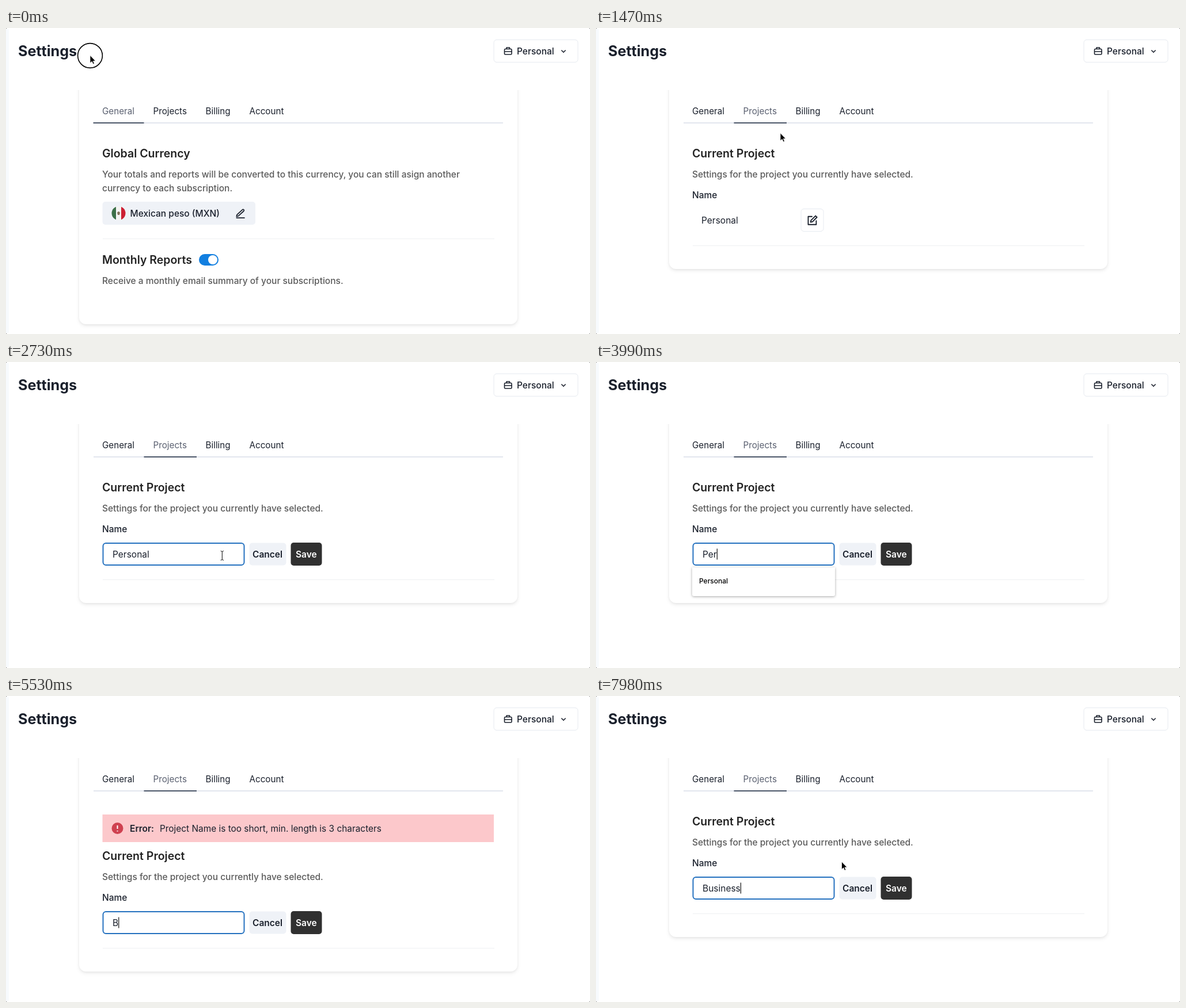
Write an HTML page that moves like this. It is 1014x532 px and loops after 8000 ms.

```html
<!DOCTYPE html>
<html lang="en">
<head>
<meta charset="utf-8">
<title>Project settings</title>
<style>
  html, body { margin: 0; width: 100%; height: 100%; overflow: hidden; background: #555; }
  svg { display: block; width: 100%; height: 100%; }
  text { font: 400 15.5px Inter, "Open Sans", sans-serif; fill: #1a202c; white-space: pre; }
  .title { font-size: 25.2px; font-weight: 700; }
  .heading { font-size: 19.5px; font-weight: 600; fill: #222; }
  .note { font-weight: 500; fill: #5a5a5a; }
  .medium { font-weight: 500; }
  .bold { font-weight: 600; }
  .tab { font-size: 15.2px; }
  .tab.active { fill: #5a6070; }
  .message { font-size: 15.4px; }
  .tip { font-size: 13.7px; font-weight: 500; fill: #fff; }
  .option { font-size: 12px; font-weight: 500; fill: #000; }
  .box { fill: #fff; stroke: #e6eaf0; }
  .rule { stroke: #eef0f2; }
  .icon { fill: none; stroke: #1a202c; stroke-width: 2.3; stroke-linejoin: round; stroke-linecap: round; }
  .icon.small { stroke-width: 1.6; }
  #card { fill: #fff; filter: drop-shadow(0 3px 3px rgba(0,0,0,.07)) drop-shadow(0 1px 2px rgba(0,0,0,.05)); }
  .float { filter: drop-shadow(0 1px 2px rgba(0,0,0,.35)); }
</style>
</head>
<body>
<svg viewBox="0 0 1014 532" preserveAspectRatio="none">
  <defs>
    <clipPath id="disc"><circle cx="195.5" cy="322" r="12"/></clipPath>
  </defs>
  <rect width="1014" height="532" rx="2" fill="#fff"/>
  <rect y="2" width="5" height="528" fill="#f7fafd"/>

  <text class="title" x="21" y="49">Settings</text>
  <rect class="box" x="847" y="20.5" width="146" height="39" rx="5"/>
  <g class="icon small">
    <rect x="865.5" y="36.5" width="12.5" height="9.5" rx="1.5"/>
    <path d="M869 36v-2h5.5v2M866 41h12M964.8 39l3.2 3.2 3.2-3.2"/>
  </g>
  <text class="medium" x="887" y="46">Personal</text>

  <!-- the card slides under the page header, which hides its top edge -->
  <rect id="card" x="127" y="90" width="761" rx="12"/>
  <rect x="110" y="80" width="795" height="28" fill="#fff"/>
  <path d="M152 165H863" stroke="#e2e6ee" stroke-width="2"/>
  <rect id="underline" y="164" height="2" fill="#4a5568"/>
  <text class="tab" x="167" y="150">General</text>
  <text class="tab" x="255.6" y="150">Projects</text>
  <text class="tab" x="346.6" y="150">Billing</text>
  <text class="tab" x="422.5" y="150">Account</text>

  <g id="general">
    <text class="heading" x="167" y="225">Global Currency</text>
    <text class="note" x="167" y="260">Your totals and reports will be converted to this currency, you can still asign another</text>
    <text class="note" x="167" y="284">currency to each subscription.</text>
    <rect x="167.5" y="302" width="265.5" height="40" rx="5" fill="#eff2f7"/>
    <g clip-path="url(#disc)">
      <rect x="183" y="310" width="25" height="24" fill="#f4f4f2"/>
      <rect x="183" y="310" width="8" height="24" fill="#3c7048"/>
      <rect x="200" y="310" width="8" height="24" fill="#cc1f33"/>
      <path d="M193 321q2.5-4 5 0l-1 4h-3z" fill="#82735c"/>
    </g>
    <text class="medium" x="215.5" y="328">Mexican peso (MXN)</text>
    <path class="icon" transform="translate(398 313.3) scale(.76)" d="M3 22h18M16.5 3.5a2.1 2.1 0 0 1 3 3L7 18l-4 1 1-4z"/>
    <path class="rule" d="M168 366.5H848"/>
    <text class="heading" x="167" y="410">Monthly Reports</text>
    <rect x="335" y="393" width="34" height="20" rx="10" fill="#127fe0"/>
    <circle cx="359" cy="403" r="8" fill="#fff"/>
    <text class="note" x="167" y="445">Receive a monthly email summary of your subscriptions.</text>
  </g>

  <g id="error">
    <rect x="167.5" y="206" width="679.5" height="48" fill="#fcc8cb"/>
    <circle cx="193.5" cy="230" r="10" fill="#cf4150"/>
    <path d="M193.5 225v6M193.5 234v1.5" stroke="#fff" stroke-width="2"/>
    <text class="bold" x="215" y="236">Error:</text>
    <text class="message" x="267" y="236">Project Name is too short, min. length is 3 characters</text>
  </g>

  <g id="project">
    <text class="heading" x="167" y="225">Current Project</text>
    <text class="note" x="167" y="260">Settings for the project you currently have selected.</text>
    <text class="medium" x="167" y="296">Name</text>
    <path class="rule" d="M168 378.5H848"/>
    <g id="view">
      <text x="183" y="340">Personal</text>
      <rect id="editButton" class="box" x="356" y="314.5" width="39" height="39" rx="5"/>
      <path class="icon" transform="translate(366 324.5) scale(.82)" d="M11 4H3v17h17v-8M18.5 2.5l3 3L12 15l-4 1 1-4z"/>
      <g id="tooltip">
        <rect class="float" x="295.5" y="362" width="160" height="25" rx="2" fill="#70757f"/>
        <text class="tip" x="303.5" y="379.5">Change Project Name</text>
      </g>
    </g>
    <g id="edit">
      <rect id="field" x="168.5" y="315" width="245" height="38" rx="5" fill="#fff"/>
      <text id="value" x="185" y="340"></text>
      <rect id="caret" y="324.5" width="1.2" height="19" fill="#111"/>
      <rect x="422.5" y="314.5" width="64" height="39" rx="5" fill="#eff2f7"/>
      <text class="bold" x="428" y="340">Cancel</text>
      <rect x="494.5" y="314" width="54" height="40" rx="5" fill="#303030"/>
      <text class="bold" x="503" y="340" style="fill:#fff">Save</text>
      <g id="suggestion">
        <path class="float" d="M167 357h248v47q0 3-3 3h-242q-3 0-3-3z" fill="#fff"/>
        <text class="option" x="179" y="385">Personal</text>
      </g>
    </g>
  </g>

  <g id="pointer">
    <circle id="ring" fill="none" stroke="#000" stroke-width="1.6"/>
    <path id="arrow" d="M0-.5V13L3.2 10.2 5.2 14.8 7.4 13.8 5.4 9.4H9.5z" fill="#000" stroke="#fff" stroke-width=".8"/>
    <g id="hand" stroke="#000" stroke-width="1.1" stroke-linejoin="round">
      <path fill="#fff" d="M-1.4 1.2a1.4 1.4 0 0 1 2.8 0V6a1.4 1.4 0 0 1 2.8 .3 1.4 1.4 0 0 1 2.8 .5 1.3 1.3 0 0 1 2.6 .7V11.5c0 2-1.4 3-1.4 5.5H1c0-2.2-3.8-5-5-7.2-.6-1.6 .9-2.2 2.1-.9l.5 .6z"/>
      <path d="M2 11.5v3M4.2 11.5v3M6.4 11.5v3"/>
    </g>
    <path id="beam" d="M-2.5-8q2 0 2.5 1.5 .5-1.5 2.5-1.5M0-6.5V6.5M-2.5 8q2 0 2.5-1.5 .5 1.5 2.5 1.5" fill="none" stroke="#000"/>
  </g>
</svg>
<script>
const LOOP = 8000, STEP = 70, BLINK = 490;
const $ = id => document.getElementById(id);
const tabs = document.querySelectorAll('.tab');

// [time, name shown in the field]
const typing = [
  [2240, 'Personal'], [3220, 'Persona'], [3430, 'Person'], [3640, 'Perso'], [3780, 'Pers'], [3920, 'Per'],
  [4200, 'Pe'], [4760, 'P'], [4830, ''], [5530, 'B'], [6160, 'Bu'], [6440, 'Bus'],
  [6580, 'Busi'], [6720, 'Busin'], [7140, 'Busine'], [7350, 'Busines'], [7560, 'Business']
];
// [time, x, y] of the pointer's hot spot
const route = [
  [0, 146, 48], [140, 146, 48], [700, 269.7, 132.3], [910, 269.7, 132.3], [1050, 275, 104], [1190, 288, 84],
  [1820, 360, 307], [1960, 375, 336.5], [7400, 377, 337], [7560, 377, 332], [7700, 371, 306],
  [7770, 371, 306], [7980, 426.5, 288.5]
];
const clicks = [-240, 770, 2100];

const clamp01 = v => Math.min(1, Math.max(0, v));
const show = (id, on) => $(id).style.display = on ? '' : 'none';
const set = (id, attrs) => { for (const k in attrs) $(id).setAttribute(k, attrs[k]); };
const lastBefore = (list, t) => list.filter(item => item[0] <= t).pop();

function pointerAt(t) {
  const i = route.findIndex(p => p[0] > t);
  if (i < 0) return route[route.length - 1].slice(1);
  const [t0, x0, y0] = route[i - 1], [t1, x1, y1] = route[i];
  const k = (t - t0) / (t1 - t0);
  return [x0 + (x1 - x0) * k, y0 + (y1 - y0) * k];
}

function drawPointer(t, editing) {
  const [x, y] = pointerAt(t);
  const overTab = y > 124 && y < 166 && x > 152 && x < 498;
  const overField = y > 314 && y < 354;
  const kind = overTab || (overField && !editing && x > 356) ? 'hand'
    : overField && editing ? 'beam' : 'arrow';
  show('pointer', t < 3220 || t >= 7490);
  set('pointer', { transform: `translate(${x} ${y})` });
  for (const id of ['arrow', 'hand', 'beam']) show(id, id === kind);

  const age = t - clicks.filter(c => c <= t).pop();
  show('ring', age < 280);
  set('ring', { r: 30.4 - 9 * clamp01((age - 70) / 140) });
}

function drawField(t) {
  const [since, name] = lastBefore(typing, t) || [0, ''];
  const focused = t >= 2380;
  $('value').textContent = name;
  set('caret', { x: 185 + (name ? $('value').getComputedTextLength() : 0) });
  show('caret', focused && Math.floor((t - since) / BLINK) % 2 === 0);
  set('field', { stroke: focused ? '#2471bf' : '#e2e8f0', 'stroke-width': focused ? 2 : 1 });
  show('suggestion', t >= 3220 && t < 5180);
}

function draw(now) {
  const t = Math.floor((now % LOOP) / STEP) * STEP;
  const onProjects = t >= 840, editing = t >= 2240;
  const invalid = t >= 4200 && t < 6440;
  const active = t >= 1050 ? 1 : 0;

  tabs.forEach((tab, i) => tab.classList.toggle('active', i === active));
  set('underline', active ? { x: 239.5, width: 91.5 } : { x: 151.5, width: 88 });
  show('general', !onProjects);
  show('project', onProjects);
  show('error', invalid);
  set('project', { transform: `translate(0 ${invalid ? 60 : 0})` });
  set('card', { height: (onProjects ? (invalid ? 479 : 419) : 515) - 90 });

  show('view', !editing);
  show('edit', editing);
  show('tooltip', t >= 1960);
  $('editButton').style.fill = t >= 1890 ? '#eff2f7' : '';
  drawField(t);
  drawPointer(t, editing);
  requestAnimationFrame(() => draw(performance.now() - start));
}

const start = performance.now();
draw(0);
</script>
</body>
</html>
```
